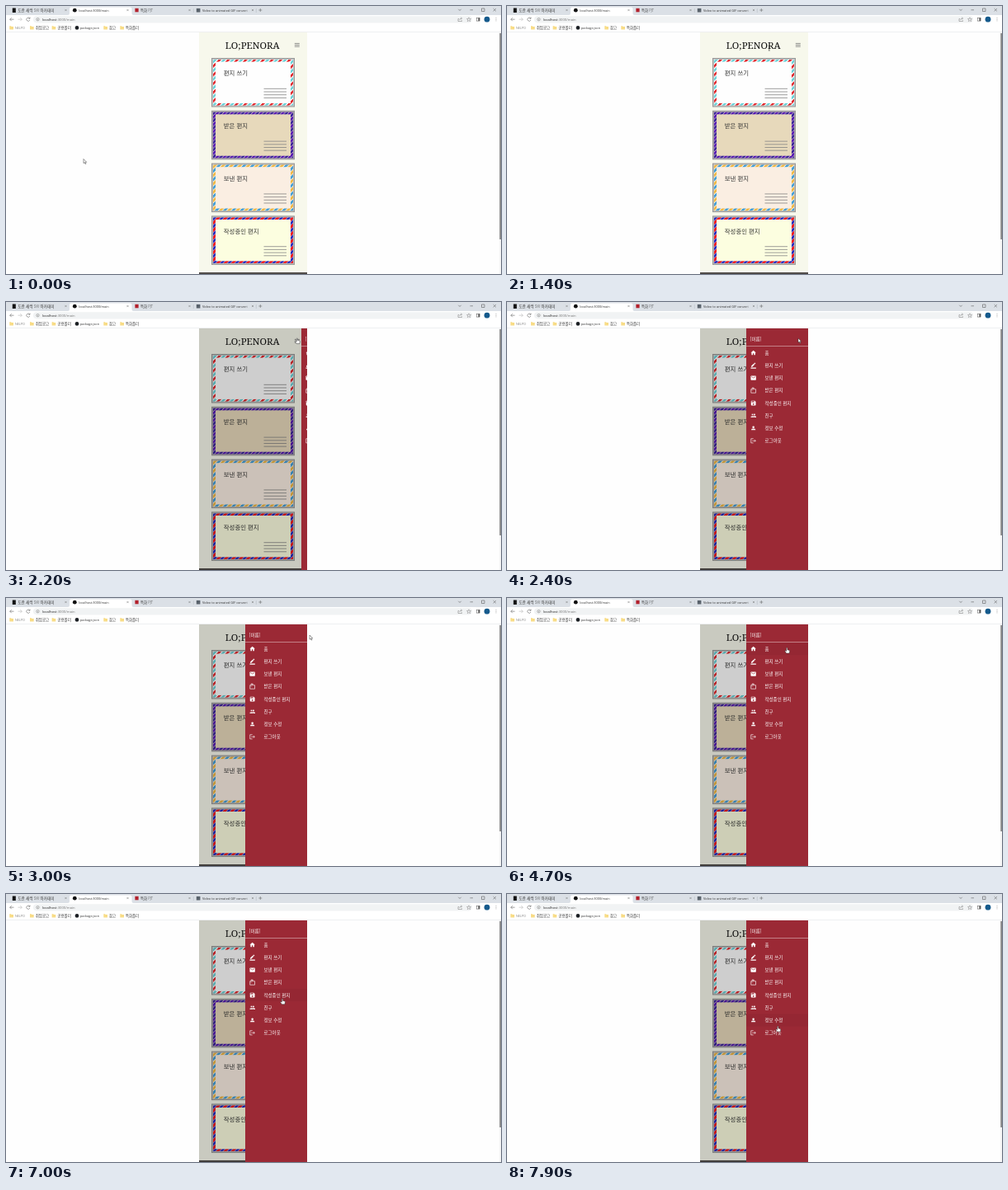
An HTML page that plays this animation: 600x325 px, repeating every 8 s.

```html
<!DOCTYPE html>
<html lang="ko">
<head>
<meta charset="utf-8">
<title>Letter app</title>
<style>
html, body { margin: 0; width: 100%; height: 100%; overflow: hidden; background: #fff; }
svg { display: block; width: 600px; height: 325px; }
text { font-family: "Open Sans", "Noto Sans CJK KR", "Noto Sans CJK", sans-serif; white-space: pre; }
.ko { font-family: "Noto Sans CJK KR", "Noto Sans CJK", sans-serif; }
.thin { font-weight: 300; }
.logo { font-family: "Noto Serif", serif; font-weight: 500; }
</style>
</head>
<body>
<svg id="stage" viewBox="0 0 600 325" xmlns="http://www.w3.org/2000/svg"></svg>
<script>
const LOOP = 8000, STEP = 100;
const PHONE = { x: 234, y: 32, w: 131, h: 293 };
const DRAWER = { x: 290, w: 75 };
const ROW = { y: 53.9, h: 15.25 };

const rect = (x, y, w, h, fill, more = '') =>
  `<rect x="${x}" y="${y}" width="${w}" height="${h}" fill="${fill}" ${more}/>`;
const circle = (x, y, r, fill, more = '') =>
  `<circle cx="${x}" cy="${y}" r="${r}" fill="${fill}" ${more}/>`;
const line = (d, color, width = 0.6) =>
  `<path d="${d}" fill="none" stroke="${color}" stroke-width="${width}"/>`;
const text = (x, y, size, str, fill = '#333', more = '') =>
  `<text x="${x}" y="${y}" font-size="${size}" fill="${fill}" ${more}>${str}</text>`;
const cross = (x, y, r, color = '#666', width = 0.45) =>
  line(`M${x - r} ${y - r}l${2 * r} ${2 * r}m0 ${-2 * r}l${-2 * r} ${2 * r}`, color, width);

function tabStrip() {
  return rect(0, 0, 600, 12, '#dbe0e6') +
    '<path d="M75 11q2 0 2-2V3.500q0-2 2-2h71.500q2 0 2 2V9q0 2 2 2z" fill="#fff"/>' +
    rect(7.8, 2.5, 4, 5.5, '#111') +
    text(14.4, 6.8, 4.6, '도란 새싹 SW 아카데미', '#333', 'class="thin"') +
    circle(83.3, 5.2, 2.4, '#111') +
    text(88.2, 6.6, 3.85, 'localhost:3000/main') +
    rect(156.4, 2.8, 4.2, 4.5, '#b3202c') +
    text(163, 6.8, 4.4, '특화 PJT', '#333', 'class="thin"') +
    rect(230.8, 2.9, 4.6, 4.6, '#59626b') +
    text(238, 6.6, 3.9, 'Video to animated GIF convert', 'url(#fade)') +
    [72.5, 147.5, 222.5, 299].map(x => cross(x, 5, 1.1)).join('') +
    line('M227.300 3v5M303.300 3v5', '#a5abb1', 0.4) +
    line('M306.300 5h4M308.300 3v4', '#555', 0.5) +
    line('M548.300 3.800l1.700 1.700l1.700-1.700M562.500 4.800h3.500M576.500 3h3.500v3.500h-3.500z', '#444', 0.5) +
    cross(592.3, 4.7, 1.7, '#444');
}

function folder(x) {
  return `<path d="M${x + 0.3} 24.200h1.700l.700.700h2.300v3.600h-4.700z" fill="#f8dc86"/>`;
}

function toolbar() {
  const marks = [[4, 'NELPO', 3.8], [28.7, '취업공고', 4.5], [55.3, '공용폴더', 4.5],
                 [118, '참고', 4.4], [138, '특화폴더', 4.4]];
  return rect(0, 11, 600, 21, '#fff') +
    rect(33, 12.2, 532, 8.2, '#f1f3f4', 'rx="4.1"') +
    line('M9.500 16.200h-4.800m2-2l-2 2l2 2', '#666') +
    line('M14.500 16.200h4.800m-2-2l2 2l-2 2', '#b5b5b5') +
    line('M28.700 15a2.100 2.100 0 1 0 .2 2M29 13.500v1.800h-1.800', '#666') +
    circle(38.5, 16.2, 1.7, 'none', 'stroke="#666" stroke-width=".45"') +
    line('M38.500 15.900v1.200', '#666', 0.5) +
    text(44, 17.8, 4.2, 'localhost<tspan fill="#777">:3000/main</tspan>', '#222') +
    line('M549 15.500h-1v3h4.500v-1.200M549.500 17q.3-2 3-2m-1.200-1.200l1.300 1.200l-1.300 1.200', '#666', 0.45) +
    line('M561 13.800l.7 1.700l1.800.1l-1.400 1.200l.5 1.800l-1.600-1l-1.600 1l.5-1.800l-1.400-1.200l1.800-.1z', '#666', 0.4) +
    rect(570.3, 14.3, 3.8, 3.8, 'none', 'stroke="#555" stroke-width=".5"') +
    rect(572.4, 14.3, 1.7, 3.8, '#555') +
    circle(583, 16.2, 3.4, '#155a8c') +
    [14.5, 16.2, 17.9].map(y => circle(594, y, 0.45, '#666')).join('') +
    marks.map(([x, name, size]) =>
      folder(x) + text(x + 7, 27.9, size, name, '#333', 'class="thin"')).join('') +
    circle(86, 26.4, 2.3, '#1b1f23') + text(90, 27.8, 3.8, 'package.json') +
    rect(0, 31.5, 600, 0.5, '#dcdfe3');
}

// Air-mail borders: slanted bands of two colours with gaps of the paper colour.
const LETTERS = [
  { name: '편지 쓰기', paper: '#fefefe', a: '#e0262b', b: '#66d0d6', period: 10.6, band: 3.5, frame: '#c6c8c7' },
  { name: '받은 편지', paper: '#c9b6bd', a: '#5416b4', b: '#36209a', period: 8.8, band: 3.4, frame: '#aaa0ac', inner: '#e7d9bb' },
  { name: '보낸 편지', paper: '#faeee2', a: '#439fd6', b: '#efb63f', period: 10.2, band: 3.8, frame: '#c1bfba' },
  { name: '작성중인 편지', paper: '#fcfee0', a: '#ef1c22', b: '#2727bd', period: 9, band: 4, frame: '#bdbdbb' }
];

function stripes({ paper, a, b, period, band }, i) {
  return `<pattern id="mail${i}" width="${period}" height="10" patternUnits="userSpaceOnUse" patternTransform="skewX(-45)">` +
    rect(0, 0, period, 10, paper) + rect(0, 0, band, 10, a) +
    rect(period / 2, 0, band, 10, b) + '</pattern>';
}

function letter({ name, paper, frame, inner = paper }, i) {
  const rules = [37.3, 41, 44.7, 48.4].map(y => `M63.500 ${y}h27.500`).join('');
  return `<g transform="translate(249 ${63 + i * 63.8})">` +
    rect(0.5, 0.5, 100, 58.5, frame, 'stroke="#979797"') +
    rect(2, 2, 97, 55.5, `url(#mail${i})`) +
    rect(5, 4.6, 91, 50.3, inner) +
    text(14.8, 21.2, 7.4, name, '#333', 'class="ko thin"') +
    line(rules, '#858585', 0.8) + '</g>';
}

function page() {
  const { x, y, w, h } = PHONE;
  return rect(x, y, w, h, '#f7f8ec') +
    text(298.7, 52, 11.5, 'LO;PENORA', '#111', 'class="logo" text-anchor="middle"') +
    line('M349.800 45.400h6M349.800 47.300h6M349.800 49.200h6', '#777', 0.8) +
    LETTERS.map(letter).join('') +
    rect(x, 323, w, 2, '#504b49');
}

// Icons live on a 24 unit grid.
const path = (d, more = '') => `<path d="${d}" ${more}/>`;
const person = (x, r) => circle(x, 8, r, '#fff') +
  path(`M${x - 2 * r} 19v-2q0-4 ${2 * r}-4t${2 * r} 4v2z`);
const outline = 'fill="none" stroke="#fff" stroke-width="2"';
const MENU = [
  ['홈', path('M10 20v-6h4v6h5v-8h3L12 3 2 12h3v8z')],
  ['편지 쓰기', path('M2 20h20v4H2zM4 18v-3.700L13 5.200 16.800 9 7.800 18zM14 4l2.700-2.700 3.900 3.900L17.900 8z')],
  ['보낸 편지', rect(2, 4, 20, 16, '#fff', 'rx="2"') + line('M4 7l8 5 8-5', '#9b2935', 2)],
  ['받은 편지', path('M10 7h11v14H3V7h3M7 12V2h7v2H8', outline)],
  ['작성중인 편지', path('M5 3h12l4 4v12q0 2-2 2H5q-2 0-2-2V5q0-2 2-2z') +
    rect(5, 5, 10, 4, '#9b2935') + circle(12, 16, 3, '#9b2935')],
  ['친구', person(16, 3.2) + `<g stroke="#9b2935">${person(8.5, 3.4)}</g>`],
  ['정보 수정', person(12, 4)],
  ['로그아웃', path('M12 4H3v16h9M8 12h12M16 7.500l4.500 4.500l-4.500 4.500', outline)]
];

function drawer() {
  const { x, w } = DRAWER;
  return rect(x, 32, w, 293, '#9b2935') +
    rect(x, 0, w, ROW.h, '#000', 'id="hover" opacity=".04"') +
    text(294.6, 47.3, 5.5, '[이름]', '#fff', 'class="ko"') +
    rect(x, 53.2, w, 0.7, '#d5a5aa') +
    MENU.map(([name, icon], i) => {
      const y = ROW.y + ROW.h * (i + 0.5);
      return `<g fill="#fff" transform="translate(294.800 ${y - 3.8}) scale(.320)">${icon}</g>` +
        text(312.5, y + 2, 5.5, name, '#fff', 'class="ko" font-weight="500"');
    }).join('');
}

const CURSORS = {
  arrow: '<path d="M0 0v5.200l1.200-1.100l.9 2l.9-.4l-.9-1.900h1.600z" fill="#fff" stroke="#222" stroke-width=".450"/>',
  hand: '<path d="M-.600.300q.600-.700 1.200 0v2.200l2.300.600q.600.200.500.900l-.500 2.700H-.700L-2.300 4.200q0-.900.800-.700l.900.700z" fill="#fff" stroke="#222" stroke-width=".450"/>',
  beam: '<path d="M-1 0h2M0 0v6M-1 6h2" fill="none" stroke="#222" stroke-width=".500"/>'
};

const stage = document.getElementById('stage');
stage.innerHTML = '<defs>' + LETTERS.map(stripes).join('') +
  '<linearGradient id="fade" gradientUnits="userSpaceOnUse" x1="289" x2="297.500" y1="0" y2="0">' +
  '<stop stop-color="#333"/><stop offset="1" stop-color="#333" stop-opacity="0"/></linearGradient>' +
  `<clipPath id="phone">${rect(PHONE.x, PHONE.y, PHONE.w, PHONE.h, '#000')}</clipPath></defs>` +
  rect(0, 0, 600, 325, '#fefefe') + tabStrip() + toolbar() + page() +
  rect(PHONE.x, PHONE.y, PHONE.w, PHONE.h, '#000', 'id="dim" opacity=".19"') +
  `<g clip-path="url(#phone)"><g id="drawer">${drawer()}</g></g>` +
  rect(597.8, 32, 2.2, 293, '#f6f6f6') + rect(598.3, 33, 1.7, 250, '#858585') +
  '<g id="cursor">' + Object.keys(CURSORS).map(k => `<g id="${k}">${CURSORS[k]}</g>`).join('') + '</g>';

const el = id => document.getElementById(id);
const show = (id, on) => el(id).setAttribute('visibility', on ? 'inherit' : 'hidden');
const move = (id, x, y) => el(id).setAttribute('transform', `translate(${x} ${y})`);

// Pointer stops: time, x, y
const PATH = [
  [0, 94, 185.5], [500, 258, 56], [900, 258, 56], [1100, 241, 50], [1400, 317.8, 48],
  [1600, 359, 43], [1800, 354, 45], [2000, 352.8, 43.8], [2400, 353, 44],
  [3000, 368, 45], [3400, 402, 53], [4100, 402, 53], [4700, 339.3, 60.3],
  [4800, 339.3, 60.3], [5200, 338.5, 74], [5300, 338.5, 74], [5700, 337, 90],
  [5800, 337, 90], [6200, 336, 105], [6300, 336, 105], [7000, 335, 127],
  [7200, 334.5, 131], [7900, 328.3, 160.4], [8000, 328.3, 160.4]
];

function pointer(t) {
  const i = PATH.findIndex(p => p[0] > t);
  const [t0, x0, y0] = PATH[i - 1], [t1, x1, y1] = PATH[i];
  const k = (t - t0) / (t1 - t0), e = k * k * (3 - 2 * k);
  return [x0 + (x1 - x0) * e, y0 + (y1 - y0) * e];
}

function slide(t) {
  const k = Math.min(Math.max((t - 2193) / 225, 0), 1);
  return 1 - Math.pow(1 - k, 3.1);
}

function shape(x, y, open, row) {
  if (row >= 0) return 'hand';
  if (open) return 'arrow';
  if (x > 266 && x < 331 && y < 55) return 'beam';
  return x > 348 && x < 358 && y < 52 ? 'hand' : 'arrow';
}

function draw(now) {
  const t = Math.floor((now % LOOP) / STEP) * STEP;
  const [x, y] = pointer(t);
  const open = t >= 2200;
  const inside = t > 2400 && x >= DRAWER.x && x < DRAWER.x + DRAWER.w && y >= ROW.y;
  const row = inside ? Math.floor((y - ROW.y) / ROW.h) : -1;
  const kind = shape(x, y, t >= 2300, row);

  show('dim', open);
  show('drawer', open);
  move('drawer', DRAWER.w * (1 - slide(t)), 0);
  show('hover', open && row >= 0);
  el('hover').setAttribute('y', ROW.y + row * ROW.h);
  move('cursor', x, y);
  Object.keys(CURSORS).forEach(k => show(k, k === kind));
}

const start = performance.now();
function tick() {
  draw(performance.now() - start);
  requestAnimationFrame(tick);
}
tick();
</script>
</body>
</html>
```
